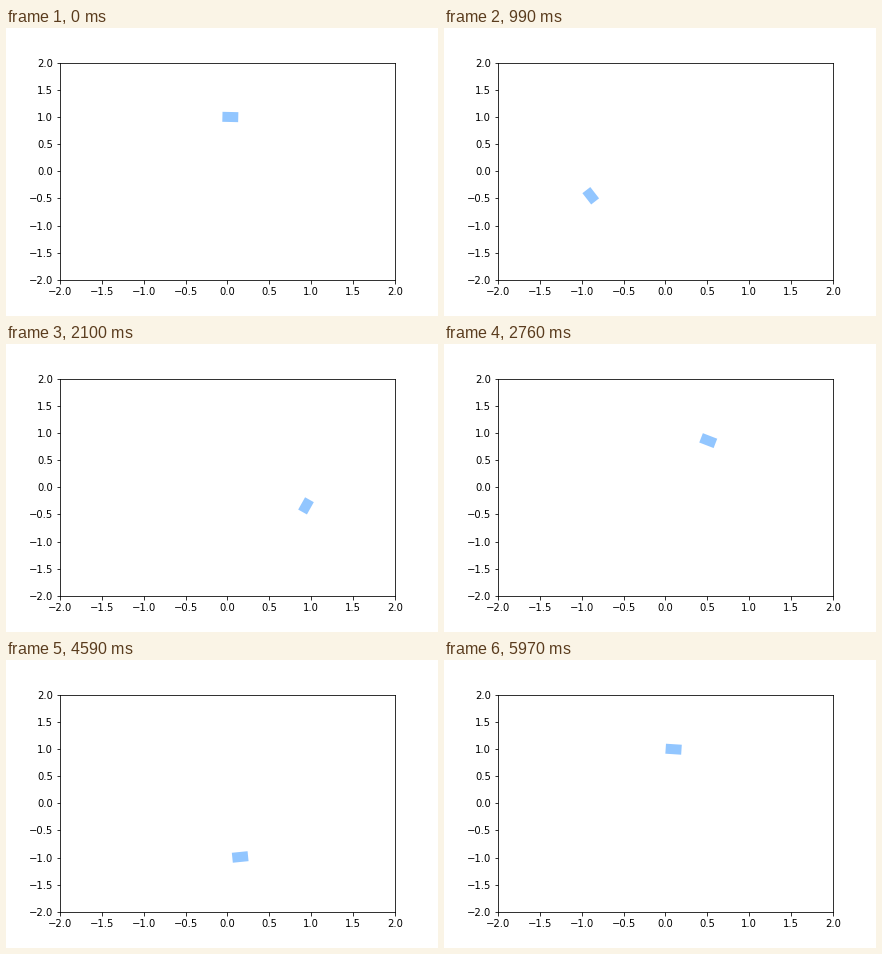
Recreate the animation shown at these times as a matplotlib script. Size 432x288 px, loop 6000 ms.

```python
import numpy as np
import matplotlib.pyplot as plt
from matplotlib.animation import FuncAnimation

FRAMES = 200
INTERVAL = 30
STEP = 2 * np.pi / 100  # one lap every 100 frames
TRAIL = 0.07            # arc length behind the head, in radians

fig, ax = plt.subplots(figsize=(6, 4), dpi=72, facecolor="white")
fig.subplots_adjust(left=0.125, right=0.9, bottom=0.125, top=0.88)
ax.set(xlim=(-2, 2), ylim=(-2, 2))
ticks = np.arange(-2, 2.1, 0.5)
ax.set_xticks(ticks)
ax.set_yticks(ticks)

line, = ax.plot([], [], lw=10, color="#92C6FF", solid_capstyle="projecting")


def update(i):
    head = np.pi / 2 + i * STEP
    angle = np.array([head, head - TRAIL])
    line.set_data(np.cos(angle), np.sin(angle))
    return line,


anim = FuncAnimation(fig, update, frames=FRAMES, interval=INTERVAL,
                     repeat=True, repeat_delay=0)
plt.show()
```
